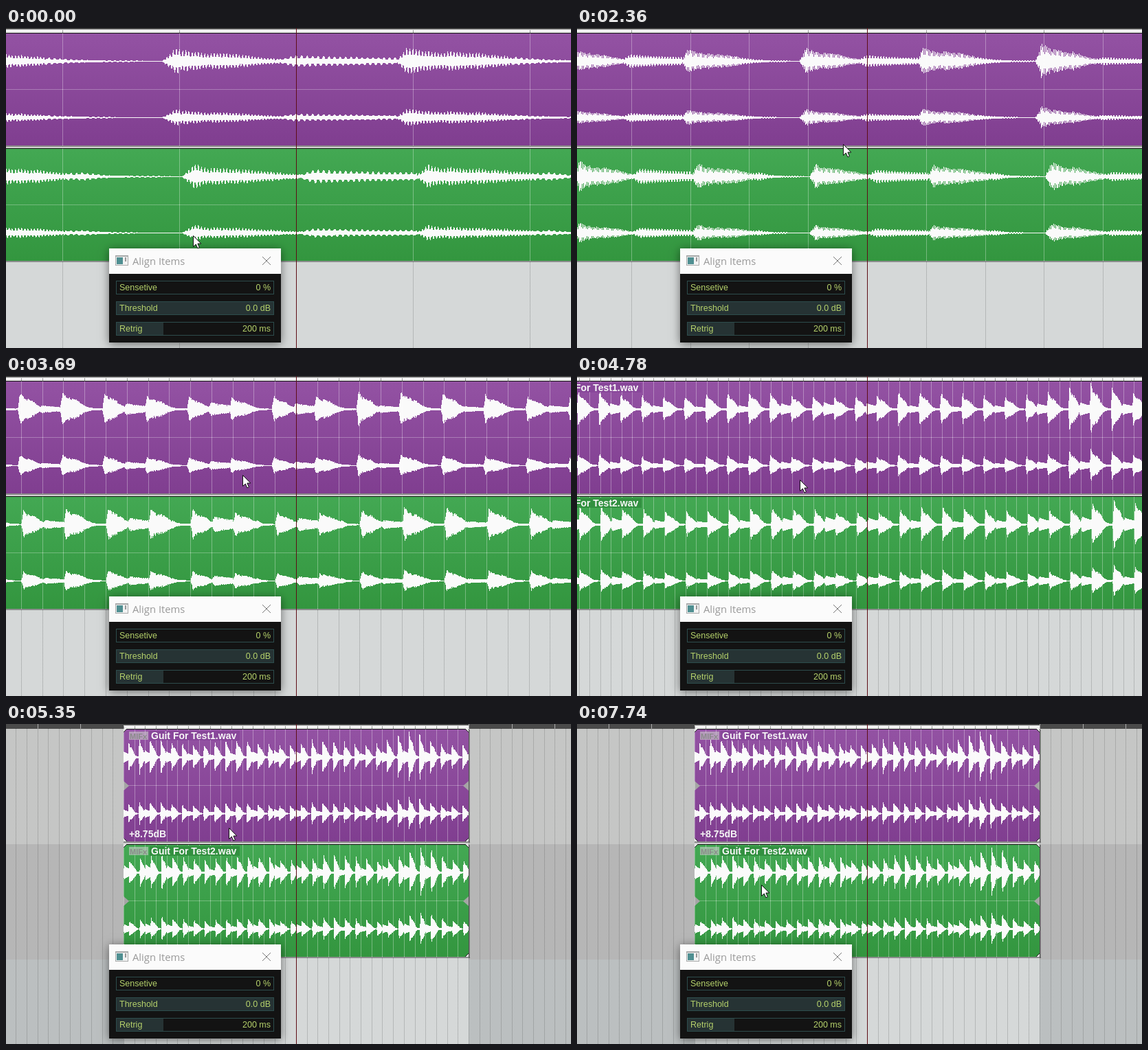
An HTML page with a canvas that plays this animation: 822x466 px, repeating every 7990 ms.

```html
<!DOCTYPE html>
<html lang="en">
<head>
<meta charset="utf-8">
<title>Align Items</title>
<style>
  html, body { margin: 0; width: 100%; height: 100%; overflow: hidden; background: #d4d7d7; }
  canvas { display: block; }
</style>
</head>
<body>
<canvas id="stage" width="822" height="466"></canvas>
<script>
const W = 822, H = 466, LOOP = 7990, TICKS = 30, TICK_LEAD = 40;
const PLAYHEAD = 422, HALF_LENGTH = 16, FIRST_SCALE = 340, ZOOM_STEP = 1.4075;
const TAU = 2 * Math.PI;
const stage = document.getElementById('stage').getContext('2d');
const scene = document.createElement('canvas');
scene.width = W;
scene.height = H;
const g = scene.getContext('2d');

// Ticks at which the wheel zooms out by one notch.
const wheel = [9, 9, 13, 14, 14, 15, 16, 19, 20];

// Pointer turning points: [tick, x, y]
const turns = [[0, 272, 302], [2, 643, 294], [3, 597, 79], [4, 526, 69], [5, 570, 263],
  [6, 622, 160], [8, 343, 150], [9, 387, 169], [10, 387, 169], [12, 247, 146],
  [14, 344, 144], [16, 311, 159], [18, 324, 151], [21, 324, 151], [23, 580, 90],
  [24, 282, 104], [26, 457, 253], [27, 570, 165], [29, 268, 234]];

const tracks = [
  { top: 8, name: 'Guit For Test1.wav', gain: '+8.75dB', light: '#9352a3', dark: '#803e90',
    tag: '#88479a', lag: .57, loudest: 11, even: 11, odd: 3 },
  { top: 176, name: 'Guit For Test2.wav', light: '#43a853', dark: '#33963f',
    tag: '#329040', lag: .485, loudest: 12, even: 13, odd: 7 }
];

function hash(n) {
  const s = Math.sin(n * 127.1 + 11.7) * 43758.5453;
  return s - Math.floor(s);
}

// Plucked note: quick attack, spike, sustain, then a soft cutoff at the knee.
function pluck(u, knee) {
  const spike = .42 * Math.exp(-Math.abs(u - .05) / .06);
  const sustain = .58 / (1 + (u / knee) ** 6);
  return Math.min(1, .08 + u / .05) * (spike + sustain) + .015;
}

const loudness = (track, n) => 22.5
  + 4.5 * Math.cos(TAU * (n - track.loudest) / 8)
  + 12 * Math.exp(-(((n - track.loudest) / 1.7) ** 2));

// A softer note on the second half of each beat, long on even beats.
function answer(track, n, v) {
  if (v < 0) return 0;
  const attack = Math.min(1, .2 + v / .08);
  if (n & 1) return track.odd * attack * Math.exp(-((v / .15) ** 2));
  return track.even * attack * (.7 + .3 * Math.cos(TAU * (n + 2) / 12)) / (1 + 2 * v);
}

// Upward and downward excursion of the signal at a time in beats.
function signal(track, beat) {
  const n = Math.floor(beat + track.lag), u = beat + track.lag - n;
  const main = loudness(track, n) * pluck(u, n & 1 ? .49 : .42);
  const level = Math.max(main, answer(track, n, u - .5));
  const cycle = beat / (u < .5 ? .0135 : .0235);
  const wave = Math.cos(cycle * TAU);
  const rough = u < .5 ? .75 + .3 * hash(Math.floor(cycle)) : 1;
  const tooth = side => level * rough * (.5 + .5 * Math.max(0, side));
  return [tooth(wave), .92 * tooth(-wave)];
}

function rect(x, y, w, h, color) {
  g.fillStyle = color;
  g.fillRect(x, y, w, h);
}

function text(string, x, y, font, color, align = 'left') {
  g.font = font;
  g.fillStyle = color;
  g.textAlign = align;
  g.fillText(string, x, y);
}

function polygon(points, color) {
  g.fillStyle = color;
  g.beginPath();
  points.forEach(([x, y]) => g.lineTo(x, y));
  g.closePath();
  g.fill();
}

function line(x0, y0, x1, y1, color, dash = []) {
  g.strokeStyle = color;
  g.setLineDash(dash);
  g.beginPath();
  g.moveTo(x0, y0);
  g.lineTo(x1, y1);
  g.stroke();
  g.setLineDash([]);
}

const dottedLine = (x, from, to, color) => line(x + .5, from, x + .5, to, color, [1, 1]);

function drawWave(track, scale, left, right) {
  const samples = Math.ceil(650 / scale);
  g.fillStyle = '#fafafa';
  for (let x = Math.max(0, left); x < Math.min(W, right); x++) {
    let up = 0, down = 0;
    for (let i = 0; i < samples; i++) {
      const [a, b] = signal(track, (x + i / samples - PLAYHEAD) / scale);
      up = Math.max(up, a);
      down = Math.max(down, b);
    }
    for (const [middle, gain] of [[40, 1], [122, .64]]) {
      const high = Math.min(40, Math.round(up * gain));
      const low = Math.min(40, Math.round(down * gain));
      g.fillRect(x, track.top + middle - high, 1, high + low + 1);
    }
  }
}

function drawItem(track, scale, left, right) {
  const { top } = track, bottom = top + 163, width = right - left;
  rect(left, bottom, width + 2, 2, 'rgba(0,0,0,.35)');
  rect(left, top - 1, width, 1, '#151515');
  const shade = g.createLinearGradient(0, top, 0, bottom);
  shade.addColorStop(0, track.light);
  shade.addColorStop(1, track.dark);
  rect(left, top, width, 163, shade);
  rect(left, top + 81, width, 1, 'rgba(255,255,255,.28)');
  drawWave(track, scale, left, right);

  for (const [x, dir] of [[left, 1], [right, -1]]) {
    polygon([[x, top + 75], [x + 8 * dir, top + 82], [x, top + 89]], '#a5a5a5');
    for (const [y, dy] of [[top - 1, 1], [bottom, -1]]) {
      polygon([[x, y], [x + 5 * dir, y], [x, y + 5 * dy]], '#e4e4e4');
      line(x + 5 * dir, y, x, y + 5 * dy, '#222');
    }
  }
  dottedLine(right, top, bottom, '#222');
  dottedLine(right + 1, top + 1, bottom + 1, '#555');
}

function drawLabels(track, left) {
  const font = 'bold 14px "Liberation Sans", Arial, sans-serif';
  const { top } = track;
  rect(left + 38, top + 2, 131, 14, track.tag);
  rect(left + 8, top + 3, 28, 12, 'rgba(205,205,205,.6)');
  text('MIFx', left + 9, top + 13.5, 'bold 11px "Liberation Sans", Arial, sans-serif', '#8b8b8b');
  text(track.name, left + 40, top + 14, font, '#f8f8f8');
  if (track.gain) text(track.gain, left + 8, top + 157, font, '#f4f4f4');
}

function drawGrid(scale, left, right) {
  const step = scale > 30 ? scale / 2 : scale;
  const count = Math.ceil(PLAYHEAD / step);
  for (let i = -count; i <= count; i++) {
    const x = Math.round(PLAYHEAD + i * step);
    if (x >= left && x < right) {
      for (const { top } of tracks) dottedLine(x, top, top + 163, 'rgba(255,255,255,.65)');
      dottedLine(x, 341, H, 'rgba(0,0,0,.3)');
      rect(x, 3, 1, 4, '#999');
    } else {
      dottedLine(x, 7, H, 'rgba(0,0,0,.28)');
      if (i % 4 === 0) rect(x, 0, 1, 7, '#aaa');
    }
  }
}

function drawDialog() {
  g.save();
  g.shadowColor = 'rgba(0,0,0,.5)';
  g.shadowBlur = 13;
  g.shadowOffsetY = 2;
  rect(150, 321, 250, 137, '#131313');
  g.restore();
  rect(150, 321, 250, 37, '#fbfbfb');

  rect(159, 331, 19, 15, '#a8aaaa');
  rect(160, 333, 17, 12, '#f2f2f2');
  rect(161, 334, 9, 10, '#4f8f91');
  rect(173, 334, 2, 6, '#999');
  text('Align Items', 184, 345, '14.8px "Open Sans", "Noto Sans", sans-serif', '#999');
  line(373, 333, 385, 345, '#777');
  line(385, 333, 373, 345, '#777');

  const font = '12.5px "Liberation Sans", Arial, sans-serif';
  [['Sensetive', '0 %', 0], ['Threshold', '0.0 dB', 1], ['Retrig', '200 ms', .3]]
    .forEach(([label, value, fill], i) => {
      const y = 368 + i * 30;
      rect(160, y, 230 * fill, 20, '#263334');
      g.strokeStyle = '#2d4c4c';
      g.strokeRect(160.5, y + .5, 229, 19);
      text(label, 165, y + 14, font, '#b5d16b');
      text(value, 385, y + 14, font, '#b5d16b', 'right');
    });
}

function drawScene(scale) {
  const left = Math.round(PLAYHEAD - HALF_LENGTH * scale);
  const right = Math.round(PLAYHEAD + HALF_LENGTH * scale);
  const width = right - left;

  rect(0, 0, W, H, '#bbbfc0');
  rect(0, 7, W, 168, '#c5c6c5');
  rect(0, 175, W, 168, '#b6b6b6');
  rect(0, 0, W, 7, '#4a4a4a');
  rect(left, 2, width, 5, '#efefef');
  rect(left, 171, width, 5, '#d2d2d2');
  rect(left, 339, width, H - 339, '#d5d8d8');

  tracks.forEach(track => drawItem(track, scale, left, right));
  drawGrid(scale, left, right);
  tracks.forEach(track => drawLabels(track, left));
  rect(PLAYHEAD, 0, 1, H, '#5e0d16');
  drawDialog();
}

function pointerAt(tick) {
  const next = turns.findIndex(turn => turn[0] >= tick);
  const [t1, x1, y1] = turns[next];
  const [t0, x0, y0] = turns[Math.max(0, next - 1)];
  const p = (tick - t0) / (t1 - t0 || 1);
  return [Math.round(x0 + (x1 - x0) * p), Math.round(y0 + (y1 - y0) * p)];
}

const arrow = new Path2D('M.5.5V16.5L4.3 13 6.8 18.8 9.4 17.7 6.9 12H11.8Z');

function drawPointer(x, y) {
  stage.save();
  stage.translate(x, y);
  stage.fillStyle = '#fff';
  stage.strokeStyle = '#111';
  stage.fill(arrow);
  stage.stroke(arrow);
  stage.restore();
}

let shownNotches;

function frame() {
  const time = performance.now() % LOOP;
  const tick = Math.min(TICKS - 1, Math.floor((time + TICK_LEAD) / LOOP * TICKS));
  const notches = wheel.filter(t => t <= tick).length;
  if (notches !== shownNotches) {
    drawScene(FIRST_SCALE / ZOOM_STEP ** notches);
    shownNotches = notches;
  }
  stage.drawImage(scene, 0, 0);
  drawPointer(...pointerAt(tick));
  requestAnimationFrame(frame);
}
frame();
</script>
</body>
</html>
```
